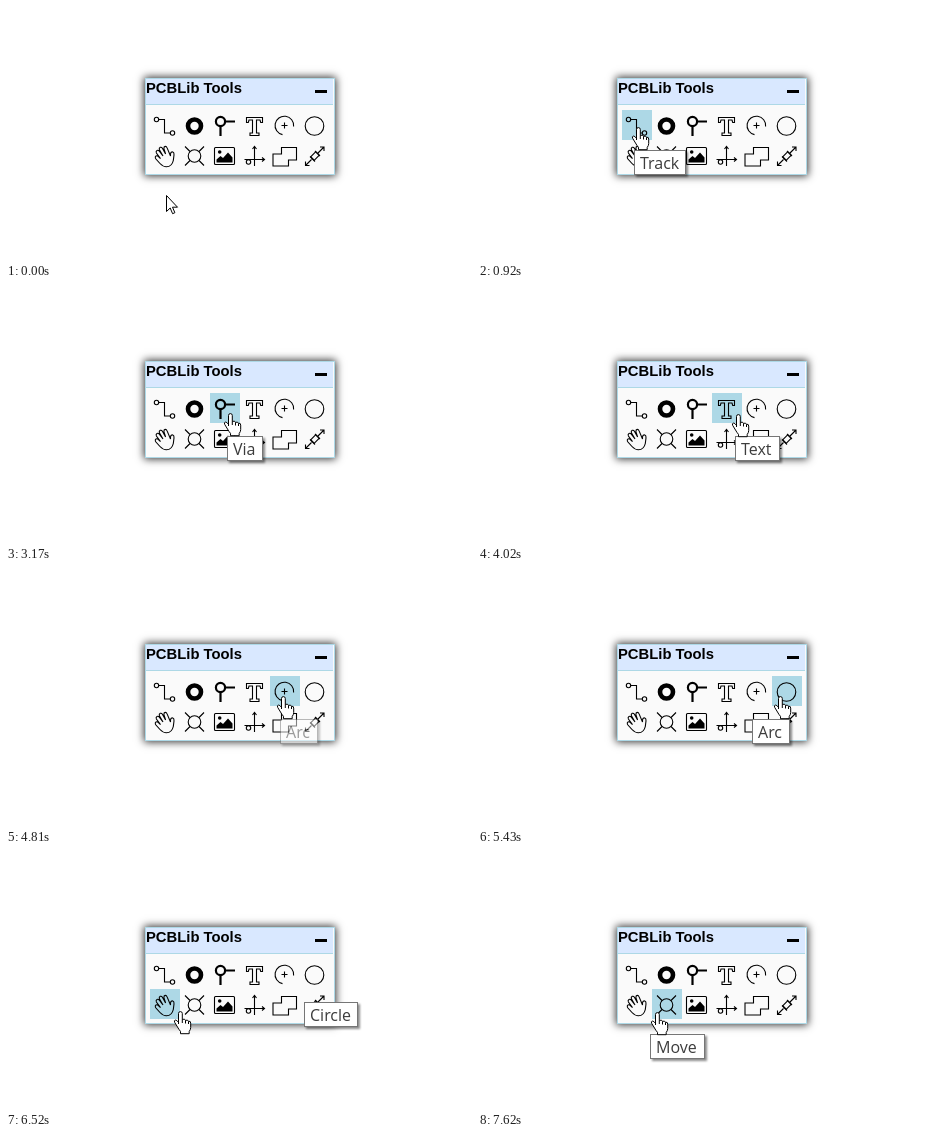
Animation, 466 px wide and 255 px high, one loop 8000 ms. Source, as an HTML page:

```html
<!DOCTYPE html>
<html lang="en">
<head>
<meta charset="utf-8">
<title>Tool palette</title>
<style>
  html, body { margin: 0; width: 100%; height: 100%; overflow: hidden; background: #fff; }
  #panel {
    position: absolute; left: 139px; top: 72px; width: 190px; height: 97px; box-sizing: border-box;
    background: #fafafa; border: 1px solid #add8e6;
    box-shadow: 0 0 8px 1px rgba(0, 0, 0, .8);
  }
  #bar { width: 187px; height: 25px; background: #d9e8ff; border-bottom: 1px solid #add8e6; }
  svg { position: absolute; left: 0; top: 0; }
  .title { font: bold 14.8px "Liberation Sans", Arial, sans-serif; }
  #icons { fill: none; stroke: #000; stroke-width: 1.1; }
  #icons .solid { fill: #000; stroke: none; }
  #tip { filter: drop-shadow(2.5px 2.5px 1.2px rgba(0, 0, 0, .45)); }
  #tip rect { fill: #fff; stroke: #767676; }
  #tip text { font: 16px "Open Sans", "Noto Sans", sans-serif; fill: #3c3c3c; }
  .cursor { fill: #fff; stroke: #000; stroke-linejoin: round; }
</style>
</head>
<body>
<div id="panel"><div id="bar"></div></div>
<svg width="466" height="255" viewBox="0 0 466 255">
  <text class="title" x="140" y="87">PCBLib Tools</text>
  <rect x="309" y="84" width="12" height="3"/>
  <rect id="hover" width="30" height="30" fill="#add8e6"/>
  <g id="icons">
    <!-- track -->
    <circle cx="150.5" cy="113.5" r="2.2"/><circle cx="166.5" cy="127" r="2.2"/>
    <path d="M152.7 113.5h5.8V127h5.8"/>
    <!-- pad -->
    <circle cx="188.5" cy="120" r="6.5" stroke-width="4.6"/>
    <!-- via -->
    <g stroke-width="2.2"><circle cx="214.5" cy="115.5" r="4.6"/><path d="M219 115.5h10M214.5 120v10"/></g>
    <!-- text -->
    <path d="M240.5 111.5h16v5h-1.8l-.7-2.5h-3.5v13h2.5v2.5h-9V127h2.5v-13H243l-.7 2.5h-1.8z"/>
    <!-- arc -->
    <path d="M287.6 120.5A9.3 9.3 0 1 0 276.5 128.6M275.5 119.5h6M278.5 116.5v6"/>
    <!-- circle -->
    <circle cx="308.5" cy="120" r="9.3"/>
    <!-- move -->
    <path d="M164.5 150V148Q165 145.5 166.8 146 168.3 146.6 168 149L167.3 154.5Q166 160.5 160.5 160.8 157 160.8 154 157.5L149.5 152.5Q148.8 150.8 150 150 151.2 149.4 152.4 150.6L154.5 152.6 150.4 147Q149.6 145.2 151 144.4 152.3 143.9 153.3 145.2L157 150 153.4 143.8Q152.8 141.9 154.2 141.3 155.6 140.9 156.4 142.3L159.6 148 157.9 142.6Q157.8 140.6 159.2 140.4 160.5 140.3 161.1 141.9z"/>
    <!-- hole -->
    <circle cx="188.5" cy="150" r="6.3"/>
    <path d="M179 140.5l5 5M198 140.5l-5 5M179 159.5l5-5M198 159.5l-5-5"/>
    <!-- image -->
    <rect x="208.5" y="141.5" width="20" height="17" rx="1"/>
    <path class="solid" d="M210.5 156.5v-3l4-3.5 2.5 2 5-5.5 4.5 5v5z"/>
    <circle class="solid" cx="213.7" cy="146" r="1.8"/>
    <!-- origin -->
    <path d="M248.5 160v-19.5M246.5 143l2-2.5 2 2.5M238.5 153.5h20M256 151.5l2.5 2-2.5 2"/>
    <circle cx="242.5" cy="156" r="2.2"/>
    <!-- outline -->
    <path d="M275.5 141.5h15v12.5h-8v6h-15.500v-12h8.500z"/>
    <!-- dimension -->
    <path d="M299.500 159.500l6-6M312 147l6-6M314 141h4v4M299.500 155.500v4h4M304 150.500l5 5M309 145l5 5"/>
    <rect x="-3.5" y="-2.5" width="7" height="5" transform="translate(309 150) rotate(-45)"/>
  </g>
  <g id="tip"><rect height="24"/><text x="5.5" y="18.5"></text></g>
  <path id="arrow" class="cursor" d="M.5.5v16l3.7-3.5 2.4 5.7 2.3-1-2.4-5.5h5z"/>
  <g id="hand" class="cursor">
    <path d="M-1.500 13V2.500a1.900 1.900 0 0 1 3.800 0v6q2.600-1.200 3.200.9 2.400-1 3 .9 2.200-.6 2.200 1.800v4.400q0 2-1.500 4v2.200H.5v-2.300q-1.700-2-3-4.400l-2.800-4.600q-1-2 .6-2.300 1.600-.2 3.200 2.300z"/>
    <path d="M2.300 8.500V12M5.500 9.400V12.500M8.500 10.300V13" fill="none"/>
  </g>
</svg>
<script>
  const LOOP = 8000, CELL = 30, LEFT = 144, TOP = 104;
  const START = { x: 160, y: 189 };

  // first step, last step, number of steps, cursor x, cursor y
  const moves = [
    [70, 290, 4, 160, 121],
    [1540, 1930, 6, 181, 122],
    [2630, 2710, 2, 224, 124],
    [3480, 3620, 3, 260, 125],
    [4340, 4490, 3, 277, 124],
    [5190, 5430, 4, 302, 124],
    [6200, 6520, 5, 174, 156],
    [7220, 7220, 1, 172, 156],
    [7450, 7620, 3, 179, 157]
  ];

  // first step, last step, number of steps, label, x, y, width
  const tips = [
    [760, 920, 3, "Track", 156, 144, 52],
    [2250, 2330, 2, "Pad", 178, 145, 40],
    [3170, 3170, 1, "Via", 221, 147, 36],
    [4020, 4020, 1, "Text", 257, 147, 45],
    [4810, 4880, 2, "Arc", 274, 147, 38],
    [5890, 5890, 1, "Circle", 298, 147, 54],
    [6990, 7070, 2, "Move", 172, 179, 55]
  ];

  const $ = id => document.getElementById(id);
  const [hover, tip, arrow, hand] = ["hover", "tip", "arrow", "hand"].map($);
  const [box, label] = tip.children;
  const show = (el, on) => el.setAttribute("visibility", on ? "visible" : "hidden");
  const place = (el, x, y) => el.setAttribute("transform", `translate(${x} ${y})`);

  // share of the steps already taken, times on a 10 ms grid
  function progress(t, first, last, count) {
    let done = 0;
    for (let k = 0; k < count; k++) {
      const at = first + (count > 1 ? (last - first) * k / (count - 1) : 0);
      if (t >= Math.round(at / 10) * 10) done++;
    }
    return done / count;
  }

  function cursorAt(t) {
    let { x, y } = START;
    for (const [first, last, count, toX, toY] of moves) {
      const p = 1 - (1 - progress(t, first, last, count)) ** 1.2;
      x += (toX - x) * p;
      y += (toY - y) * p;
    }
    return { x: Math.round(x), y: Math.round(y) };
  }

  function draw(t) {
    const { x, y } = cursorAt(t);
    const col = Math.floor((x - 1.5 - LEFT) / CELL);
    const row = Math.floor((y - TOP) / CELL);
    const over = col >= 0 && col < 6 && row >= 0 && row < 2;
    show(hover, over);
    show(hand, over);
    show(arrow, !over);
    place(hover, LEFT + col * CELL, TOP + row * CELL);
    place(hand, x, y);
    place(arrow, x, y);

    const current = tips.filter(([first]) => t >= first).pop();
    show(tip, current);
    if (!current) return;
    const [first, last, count, text, left, top, width] = current;
    place(tip, left + .5, top + .5);
    tip.setAttribute("opacity", progress(t, first, last, count));
    box.setAttribute("width", width - 1);
    label.textContent = text;
  }

  const began = performance.now();
  function tick() {
    draw((performance.now() - began) % LOOP);
    requestAnimationFrame(tick);
  }
  tick();
</script>
</body>
</html>
```
